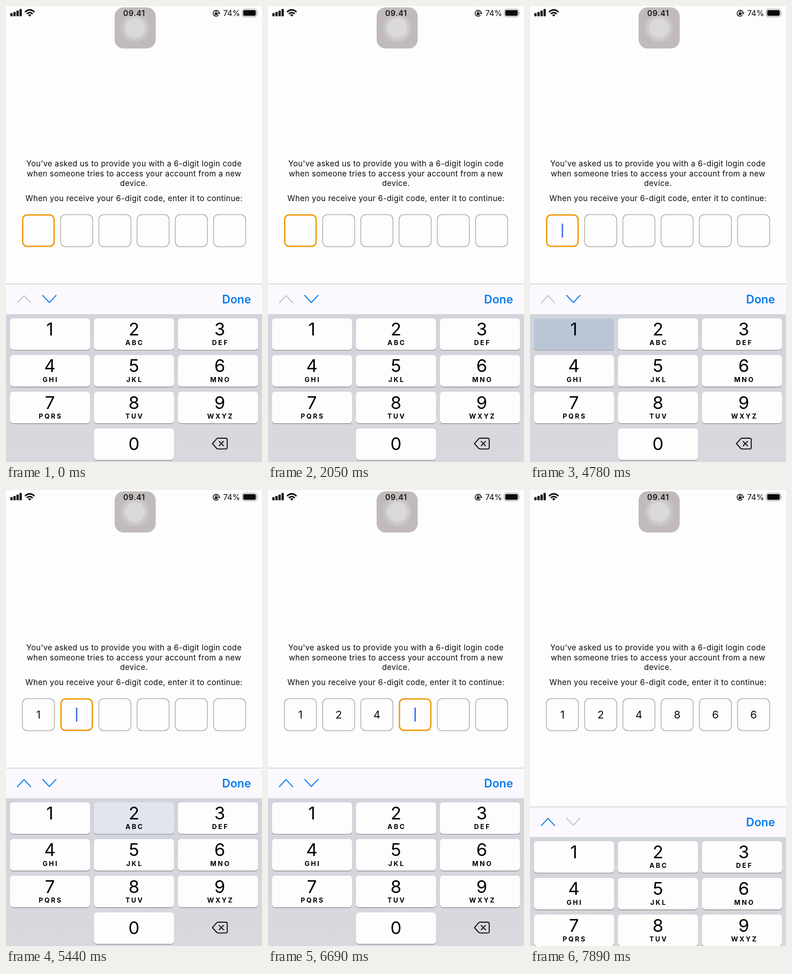
These frames come from a looping animation (561x998 px, 7.99 s). An HTML page:

```html
<!DOCTYPE html>
<html lang="en">
<head>
<meta charset="utf-8">
<title>Login code entry</title>
<style>
html, body { margin: 0; width: 100%; height: 100%; overflow: hidden; background: #fdfdfe; }
svg { display: block; width: 100%; height: 100%; font-family: Inter, "Noto Sans", sans-serif; }
.note { font-size: 17px; letter-spacing: .39px; text-anchor: middle; fill: #0c0c0c; }
.digit { font-size: 23.5px; text-anchor: middle; fill: #0c0c0c; }
.num { font-size: 38.5px; text-anchor: middle; }
.abc { font-size: 14.5px; font-weight: 700; letter-spacing: 3.1px; text-anchor: middle; }
.line { fill: none; stroke-linecap: round; stroke-linejoin: round; }
</style>
</head>
<body>
<svg viewBox="0 0 561 998" id="stage">
  <defs>
    <linearGradient id="tray" x1="0" y1="0" x2="0" y2="1">
      <stop offset="0" stop-color="#d2d4db"/>
      <stop offset="1" stop-color="#d9d8de"/>
    </linearGradient>
  </defs>
  <rect width="561" height="998" fill="#fdfdfe"/>

  <g id="touch">
    <rect x="238" y="3" width="90" height="90" rx="19.5" fill="#c0bbba"/>
    <circle cx="283" cy="48" r="32" fill="#c7c3c3"/>
    <circle cx="283" cy="48" r="27" fill="#cecbcc"/>
    <circle cx="283" cy="48" r="21.5" fill="#dad8d9"/>
  </g>

  <g id="status" fill="#0b0b0b">
    <rect x="9.5" y="15.5" width="5" height="7" rx="1.2"/>
    <rect x="16.2" y="13" width="5" height="9.5" rx="1.2"/>
    <rect x="22.9" y="10" width="5" height="12.5" rx="1.2"/>
    <rect x="29.6" y="6.5" width="5" height="16" rx="1.2"/>
    <g class="line" stroke="#0b0b0b" stroke-width="3.2" style="stroke-linecap:butt">
      <path d="M41.6 13.2Q52 3.8 62.4 13.2"/>
      <path d="M45.6 17.3Q52 11.6 58.4 17.3"/>
    </g>
    <path d="M48.4 19.6Q52 16.6 55.6 19.6L52 23.2Z"/>
    <text x="280.8" y="21.5" font-size="17" font-weight="600" letter-spacing=".6" text-anchor="middle" fill="#1c1919">09.41</text>
    <g class="line" stroke="#0b0b0b" stroke-width="1.7">
      <path d="M465.2 20.6A6.6 6.6 0 1 1 467.1 15"/>
      <path d="M458.6 15v-1.4a1.9 1.9 0 0 1 3.8 0V15" stroke-width="1.2"/>
    </g>
    <path d="M464.2 15h5.4l-2.7 3.5z"/>
    <rect x="457.3" y="14.7" width="6.4" height="5" rx=".8"/>
    <text x="476" y="21.5" font-size="17.3">74%</text>
    <rect x="517.6" y="6.8" width="32" height="16.8" rx="5" fill="none" stroke="#9c9c9c" stroke-width="1.3"/>
    <rect x="519.8" y="9" width="27.6" height="12.4" rx="3"/>
    <path d="M551 12.4q2.2 2.8 0 5.6z" fill="#9c9c9c"/>
  </g>

  <g class="note">
    <text x="280.5" y="351">You've asked us to provide you with a 6-digit login code</text>
    <text x="280.5" y="372.7">when someone tries to access your account from a new</text>
    <text x="280.5" y="393.6">device.</text>
    <text x="280.5" y="427.3">When you receive your 6-digit code, enter it to continue:</text>
  </g>

  <g id="cells"></g>
  <rect id="caret" y="476" width="3" height="31" rx="1.5" fill="#3d68ea"/>

  <g id="board">
    <rect y="608" width="561" height="67" fill="#fbf9fd"/>
    <rect y="608" width="561" height="1.2" fill="#c2c0c1"/>
    <path id="up" class="line" d="M24.8 649.5L39.5 633.8L54.2 649.5" stroke-width="2.2"/>
    <path id="down" class="line" d="M80.3 633.3L95 649L109.7 633.3" stroke-width="2.2"/>
    <text x="473.6" y="651" font-size="25" font-weight="600" fill="#087cee">Done</text>
    <rect y="674.5" width="561" height="323.5" fill="url(#tray)"/>
    <g id="keys"></g>
    <g class="line" stroke="#0b0b0b" stroke-width="2.1">
      <path d="M452.4 957.7L461.3 947.6Q462.8 945.9 465 945.9H481.2Q484.8 945.9 484.8 949.5V965.9Q484.8 969.5 481.2 969.5H465Q462.8 969.5 461.3 967.8Z"/>
      <path d="M467.2 953L476.6 962.4M476.6 953L467.2 962.4"/>
    </g>
  </g>
</svg>

<script>
const LOOP = 7990;
const BLUE = '#087cee', GREY = '#c6c2c4', ORANGE = '#f09a0c', EDGE = '#aaa6a2';
const $ = id => document.getElementById(id);

// digit, key down, key up, moment the digit lands in its cell
const taps = [
  [1, 4500, 4900, 5090],
  [2, 5440, 5590, 5870],
  [4, 5910, 6110, 6380],
  [8, 6470, 6610, 6880],
  [6, 6910, 7020, 7370],
  [6, 7495, 7610, 7770]
];
const blinks = [190, 1650, 3130];

function add(parent, tag, attrs, text = '') {
  const el = document.createElementNS('http://www.w3.org/2000/svg', tag);
  for (const k in attrs) el.setAttribute(k, attrs[k]);
  el.textContent = text;
  return parent.appendChild(el);
}

const clamp = v => Math.max(0, Math.min(1, v));
const SIDE = 71.8;
const cellX = i => 35.1 + 83.8 * i;

const cells = taps.map(([n], i) => ({
  box: add($('cells'), 'rect', { fill: '#fdfdfe' }),
  digit: add($('cells'), 'text', { class: 'digit', x: cellX(i) + SIDE / 2, y: 500 }, n)
}));

const letters = ['', '', 'ABC', 'DEF', 'GHI', 'JKL', 'MNO', 'PQRS', 'TUV', 'WXYZ'];
const centres = [96.2, 280.5, 468.5];
const shades = letters.map((abc, n) => {
  const col = n ? (n - 1) % 3 : 1;
  const row = n ? Math.floor((n - 1) / 3) : 3;
  const y = 683.7 + 80.3 * row;
  const at = { x: 9 + 184 * col, width: 175, height: 69, rx: 6.5 };
  add($('keys'), 'rect', { ...at, y: y + 1.4, fill: '#8b8c90' });
  add($('keys'), 'rect', { ...at, y, fill: '#fdfdfe' });
  const shade = add($('keys'), 'rect', { ...at, y, fill: '#bac6d6' });
  add($('keys'), 'text', { class: 'num', x: centres[col], y: y + (n ? 37.4 : 47.4) }, n);
  add($('keys'), 'text', { class: 'abc', x: centres[col] + 1.5, y: y + 58.5 }, abc);
  return shade;
});

function caretAlpha(t) {
  if (t < blinks[0]) return 0;
  const start = blinks.filter(s => s <= t).pop();
  const d = t - start;
  return Math.max(clamp(1 - d / 250), clamp((d - 550) / 240));
}

function pressed(n, t) {
  return Math.max(0, ...taps.map(([key, down, up]) =>
    key === n && t >= down ? Math.min(clamp((t - down + 20) / 50), clamp(1 - (t - up) / 80)) : 0));
}

function draw(t) {
  const active = taps.filter(tap => t >= tap[3]).length;
  cells.forEach(({ box, digit }, i) => {
    const on = i === active;
    const w = on ? 3 : 1.5;
    const attrs = {
      x: cellX(i) + w / 2, y: 455.7 + w / 2, width: SIDE - w, height: SIDE - w,
      rx: 11.5 - w / 2, stroke: on ? ORANGE : EDGE, 'stroke-width': w
    };
    for (const k in attrs) box.setAttribute(k, attrs[k]);
    digit.setAttribute('visibility', i < active ? 'visible' : 'hidden');
  });

  $('caret').setAttribute('x', cellX(active) + 34.4);
  $('caret').setAttribute('opacity', active < 6 ? caretAlpha(t) : 0);
  $('up').setAttribute('stroke', active > 0 ? BLUE : GREY);
  $('down').setAttribute('stroke', active < 5 ? BLUE : GREY);
  shades.forEach((shade, n) => shade.setAttribute('opacity', pressed(n, t)));

  const drop = 85 * Math.pow(clamp((t - 7790) / 100), 1.5);
  $('board').setAttribute('transform', `translate(0 ${drop})`);
}

const begin = performance.now();
function tick() {
  draw((performance.now() - begin) % LOOP);
  requestAnimationFrame(tick);
}
tick();
</script>
</body>
</html>
```
